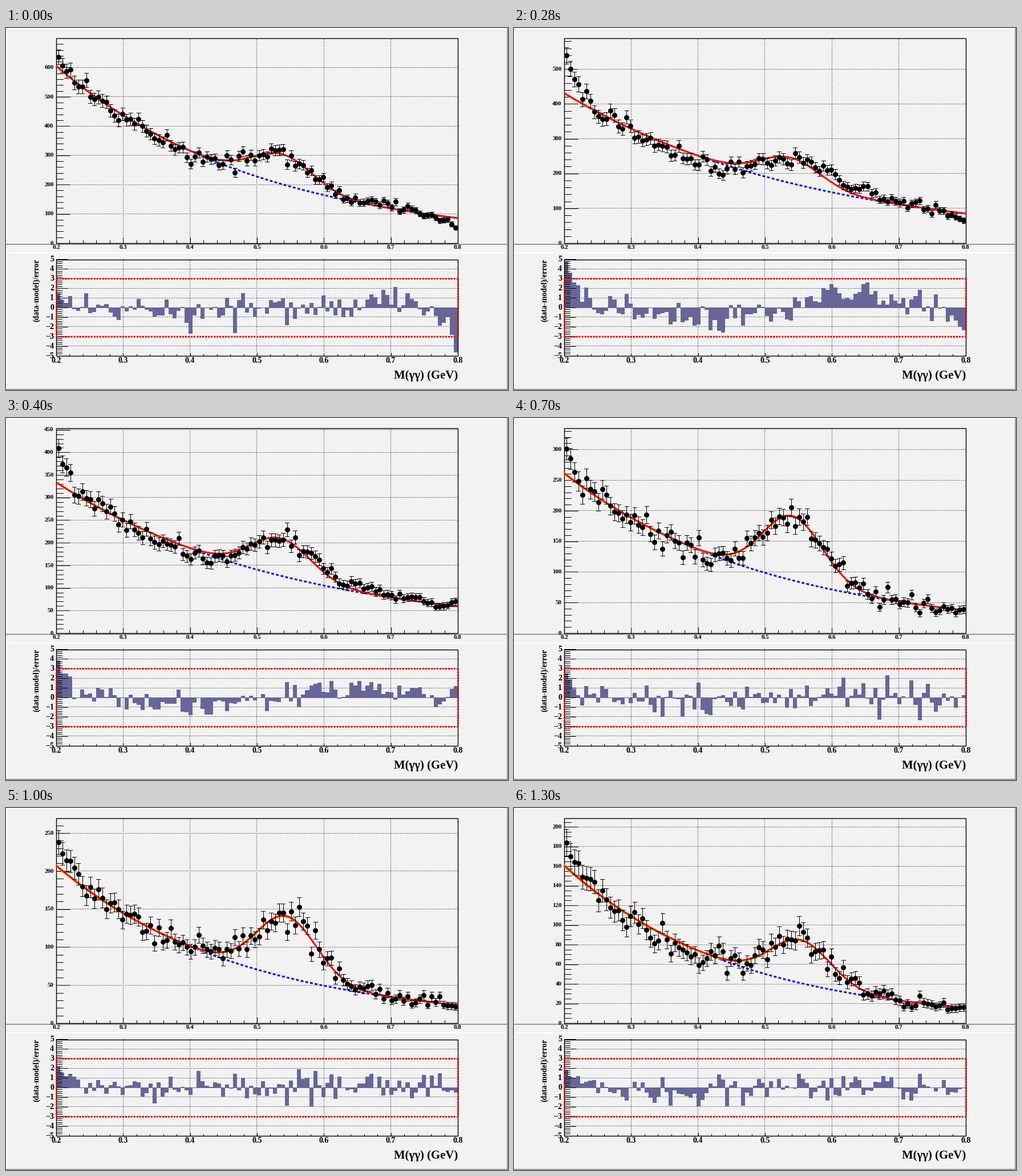
A matplotlib script for the animation above (1.6 s loop, 880 by 636 pixels).

```python
import numpy as np
import matplotlib.pyplot as plt
from matplotlib.animation import FuncAnimation
from matplotlib.patches import Rectangle

W, H, DPI = 880, 636, 80
PX = 72 / DPI                      # points per pixel
LEFT, RIGHT = 88, 792
TOP, BASE = 18, 378                # spectrum panel
R_TOP, R_BASE = 406.5, 575.5       # pull panel
R_ZERO, R_UNIT = 491, 16.9
BINS = 100

# y maximum, label step, background height and slope, peak height and mean,
# then the misfit: excess at the left edge, at the right edge, slow swing
FITS = [
    (700.0, 100, 605.0, 3.260, 103.0, 0.538, 1.0, -4.5, 0.6),
    (588.7, 100, 431.0, 2.706, 73.0, 0.538, 3.7, -2.0, 1.4),
    (453.4, 50, 333.8, 2.883, 83.0, 0.535, 3.0, 1.5, 1.1),
    (334.6, 50, 261.0, 3.247, 105.0, 0.541, 2.3, 0.3, 0.2),
    (269.5, 50, 207.3, 3.594, 80.5, 0.544, 2.0, -0.5, 0.2),
    (208.8, 20, 160.6, 3.880, 44.0, 0.553, 1.6, 0.0, 0.3),
]
PEAK_WIDTH = 0.045

fig = plt.figure(figsize=(W / DPI, H / DPI), dpi=DPI, facecolor="#f2f2f2")
ax = fig.add_axes([0, 0, 1, 1])
ax.set_xlim(0, W)
ax.set_ylim(H, 0)
ax.axis("off")


def x_pos(mass):
    return LEFT + (mass - 0.2) / 0.6 * (RIGHT - LEFT)


def line(xs, ys, color="k", width=1, z=3, **kw):
    return ax.plot(xs, ys, color=color, lw=width * PX, zorder=z,
                   solid_capstyle="butt", dash_capstyle="butt", **kw)[0]


def segments(x0, y0, x1, y1, z=3):
    """Many thin strokes as one line broken by gaps."""
    x0, y0, x1, y1 = np.broadcast_arrays(x0, y0, x1, y1)
    gap = np.full(x0.shape, np.nan)
    xs = np.column_stack([x0, x1, gap]).ravel()
    ys = np.column_stack([y0, y1, gap]).ravel()
    return line(xs, ys, z=z, antialiased=False)


def dots(xs, ys):
    """Dotted grid line with one-pixel dots."""
    return line(xs, ys, z=1, dashes=(1, 2), snap=False)


def grid_h(y):
    y = np.floor(y) + 0.5
    return dots([LEFT, RIGHT], [y, y])


def grid_v(x, base, top):
    x = np.floor(x) + 0.5
    return dots([x, x], [np.floor(base), np.floor(top)])


def label(x, y, text, size, **kw):
    style = dict(ha="center", va="center_baseline")
    style.update(kw)
    return ax.text(x, y, text, fontsize=size * PX, family="Liberation Serif",
                   weight="bold", color="k", zorder=6, **style)


def pad(top, bottom):
    """Raised border: light above and left, dark below and right."""
    h = bottom - top
    for x, y, w, h, color in [(0, top, W, 2, "white"), (0, top, 2, h, "white"),
                              (0, bottom - 2, W, 2, "#999999"),
                              (W - 2, top, 2, h, "#999999")]:
        ax.add_patch(Rectangle((x, y), w, h, fc=color, lw=0, zorder=0))


def panel(top, base, major, minor, label_y, size):
    ax.add_patch(Rectangle((LEFT, top), RIGHT - LEFT, base - top, fill=False,
                           ec="k", lw=1.4 * PX, zorder=3))
    minor_x = x_pos(np.arange(0.2, 0.801, 0.02))
    major_x = minor_x[::5]
    segments(minor_x, base, minor_x, base - minor)
    segments(major_x, base, major_x, base - major)
    for i, x in enumerate(major_x):
        if 0 < i < 6:
            grid_v(x, base, top)
        label(x, label_y, f"{0.2 + 0.1 * i:.1f}", size)


def draw_frame():
    pad(0, H)
    pad(0, 381)
    pad(394, H)
    panel(TOP, BASE, 10, 5, 384, 11)
    panel(R_TOP, R_BASE, 5, 3, 583, 14)

    fine = R_ZERO - R_UNIT * np.arange(-5, 5.01, 0.2)
    segments(LEFT, fine, LEFT + 10, fine)
    segments(LEFT, fine[::5], LEFT + 20, fine[::5])
    for n in range(-5, 6):
        y = R_ZERO - R_UNIT * n
        if abs(n) < 5:
            grid_h(y)
        label(84, y - 1, str(n).replace("-", "\u2212"), 14, ha="right")

    hi, lo = R_ZERO - 3 * R_UNIT, R_ZERO + 3 * R_UNIT
    for xs, ys in [((LEFT, RIGHT), (hi, hi)), ((LEFT, RIGHT), (lo, lo)),
                   ((LEFT, LEFT), (hi, lo)), ((RIGHT, RIGHT), (hi, lo))]:
        line(xs, ys, "red", 3, 4, dashes=(1, 0.67))

    label(54, 461, "(data-model)/error", 13.8, rotation=90, va="center")
    label(RIGHT, 616, "M(γγ) (GeV)", 20.7, ha="right", va="baseline")


def make_pulls(k, mass, left, right, swing):
    """Slow wave plus edge excesses plus seeded scatter."""
    i = np.arange(BINS)
    edge = np.exp(-i / 2.5)
    scatter = np.random.default_rng(40 + k).normal(0, 0.9, BINS)
    wave = -swing * np.sin(2 * np.pi * (mass - 0.275) / 0.5)
    pulls = wave + left * edge + right * edge[::-1] + scatter * (1 - edge - edge[::-1])
    return np.clip(pulls, -5, 5)


def draw_fit(k):
    """All artists of one fitted spectrum with its pulls."""
    y_max, step, height, slope, peak, mean, *misfit = FITS[k]

    def y_pos(n):
        return BASE - np.asarray(n) / y_max * (BASE - TOP)

    def background(m):
        return height * np.exp(-slope * (m - 0.2))

    def model(m):
        return background(m) + peak * np.exp(-0.5 * ((m - mean) / PEAK_WIDTH) ** 2)

    # vertical axis
    minor = y_pos(np.arange(0, y_max, max(step // 5, 5)))
    values = np.arange(0, y_max, step)
    major = y_pos(values)
    parts = [segments(LEFT, minor, LEFT + 12, minor),
             segments(LEFT, major, LEFT + 24, major)]
    parts += [grid_h(y) for y in major[1:]]
    parts += [label(83.5, y - 0.8, f"{n:.0f}", 11, ha="right")
              for n, y in zip(values, major)]

    # fit with its uncertainty band
    m = np.linspace(0.2, 0.8, 300)
    x, fit = x_pos(m), model(m)
    band = 0.15 * np.sqrt(fit)
    parts.append(line(x, y_pos(background(m)), "blue", 3, 3.1, dashes=(1.6, 1.2)))
    parts.append(ax.fill_between(x, y_pos(fit - band), y_pos(fit + band),
                                 color="#ffcc00", lw=0, zorder=3.2))
    parts.append(line(x, y_pos(fit), "red", 3, 3.5))

    # counts n that lie p errors from the fit, with error sqrt(n)
    centre = 0.2 + 0.6 * (np.arange(BINS) + 0.5) / BINS
    pulls = make_pulls(k, centre, *misfit)
    root = (pulls + np.sqrt(pulls ** 2 + 4 * model(centre))) / 2
    counts = np.round(root ** 2)
    error = np.sqrt(counts)
    cx = x_pos(centre)
    lo, hi = y_pos(counts - error), y_pos(counts + error)
    parts.append(segments(cx, lo, cx, hi, 4))
    parts += [segments(cx - 3.5, cap, cx + 3.5, cap, 4) for cap in (lo, hi)]
    parts.append(line(cx, y_pos(counts), z=4.2, ls="none", marker="o",
                      ms=9 * PX, mew=0))

    # pulls
    edges = np.linspace(LEFT, RIGHT, BINS + 1)
    level = R_ZERO - R_UNIT * pulls
    parts.append(ax.fill_between(np.repeat(edges, 2)[1:-1], R_ZERO, np.repeat(level, 2),
                                 color="#666699", lw=0, zorder=2))
    parts.append(line([LEFT, RIGHT], [R_ZERO, R_ZERO], "#666699", 1, 2))
    return parts


draw_frame()
states = [draw_fit(k) for k in range(len(FITS))]


def update(i):
    # the first spectrum stays one step, the others three
    current = (i + 2) // 3
    for k, parts in enumerate(states):
        for part in parts:
            part.set_visible(k == current)
    return []


anim = FuncAnimation(fig, update, frames=16, init_func=lambda: update(0),
                     interval=100, repeat=True, blit=False)
plt.show()
```
